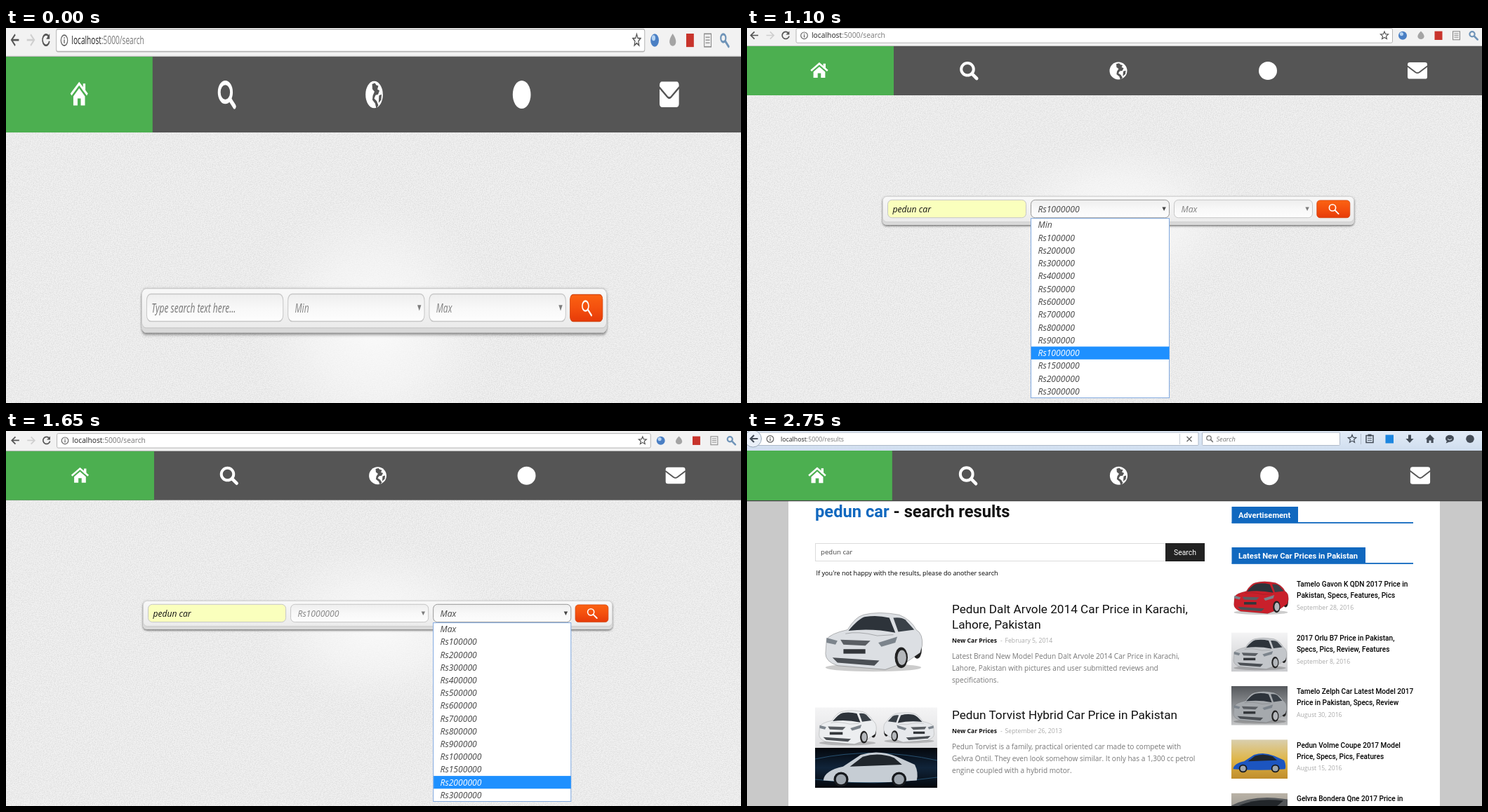
These frames come from a looping animation (1047x535 px, 3.3 s). An HTML page:

```html
<!DOCTYPE html>
<html lang="en">
<head>
<meta charset="utf-8">
<title>Car search</title>
<style>
html, body { margin: 0; width: 100%; height: 100%; overflow: hidden; background: #ebebeb; }
svg { display: block; width: 1047px; height: 535px; }
text { white-space: pre; }
.sans { font-family: "Open Sans", "Noto Sans", sans-serif; }
.rob { font-family: Roboto, Arial, sans-serif; }
.it { font-style: italic; }
.scene { visibility: hidden; }
.scene.on { visibility: visible; }
</style>
</head>
<body>
<svg id="stage" viewBox="0 0 1047 535" xmlns="http://www.w3.org/2000/svg"></svg>
<script>
const STEP = 550;
const BRAND = "Pedun", QUERY = "pedun car";

// ---- drawing helpers (return SVG markup) ----
const rect = (x, y, w, h, fill, more = "") =>
  `<rect x="${x}" y="${y}" width="${w}" height="${h}" fill="${fill}" ${more}/>`;
const disc = (x, y, r, fill, more = "") =>
  `<circle cx="${x}" cy="${y}" r="${r}" fill="${fill}" ${more}/>`;
const oval = (x, y, rx, ry, fill, more = "") =>
  `<ellipse cx="${x}" cy="${y}" rx="${rx}" ry="${ry}" fill="${fill}" ${more}/>`;
const shape = (d, fill, more = "") => `<path d="${d}" fill="${fill}" ${more}/>`;
const line = (d, color, w, more = "") =>
  `<path d="${d}" fill="none" stroke="${color}" stroke-width="${w}" ${more}/>`;
const text = (x, y, size, fill, str, cls = "sans", more = "") =>
  `<text x="${x}" y="${y}" font-size="${size}" fill="${fill}" class="${cls}" ${more}>${str}</text>`;
const group = (transform, body) => `<g transform="${transform}">${body}</g>`;
const place = ([x, sx, y, sy], body) => group(`matrix(${sx} 0 0 ${sy} ${x} ${y})`, body);
const grad = (id, stops) => `<linearGradient id="${id}" x2="0" y2="1">` +
  stops.map((c, i) => `<stop offset="${i / (stops.length - 1)}" stop-color="${c}"/>`).join("") +
  `</linearGradient>`;

const pen = document.createElement("canvas").getContext("2d");
function width(str, font) {
  pen.font = font;
  return pen.measureText(str).width;
}

function star(cx, cy, r, color) {
  const pts = [...Array(10).keys()].map(i => {
    const a = i * Math.PI / 5 - Math.PI / 2, q = i % 2 ? r * 0.45 : r;
    return `${(cx + q * Math.cos(a)).toFixed(2)} ${(cy + q * Math.sin(a)).toFixed(2)}`;
  });
  return line(`M${pts.join("L")}Z`, color, 1.2);
}
const lens = (x, y, r, tail, color, w) =>
  disc(x, y, r, "none", `stroke="${color}" stroke-width="${w}"`) +
  line(`M${x + r * 0.75} ${y + r * 0.75}l${tail} ${tail}`, color, w * 1.15, 'stroke-linecap="round"');
const info = (x, y) => disc(x, y, 4.8, "none", 'stroke="#666" stroke-width="1.2"') +
  rect(x - 0.6, y - 0.8, 1.2, 3.6, "#555") + rect(x - 0.6, y - 2.8, 1.2, 1.2, "#555");

const defs = `<defs>
  ${grad("panel", ["#f8f8f8", "#ebebeb"])}
  ${grad("field", ["#eeeeee", "#f8f8f8", "#fdfdfd"])}
  ${grad("button", ["#fb6212", "#f4500e", "#e63a08"])}
  ${grad("bar", ["#e2ebf7", "#d0deef"])}
  ${grad("studio", ["#f4f4f5", "#c9cacd"])}
  ${grad("road", ["#55585c", "#8e9194", "#c4c5c6"])}
  ${grad("night", ["#04070c", "#10243a", "#05080d"])}
  ${grad("gold", ["#d9cfae", "#dfb64a", "#c08d2c"])}
  ${grad("close", ["#b9b2a6", "#77797b"])}
  <radialGradient id="glow"><stop offset="0" stop-color="#fafafa"/>
    <stop offset=".5" stop-color="#f7f7f7" stop-opacity=".65"/>
    <stop offset="1" stop-color="#f2f2f2" stop-opacity="0"/></radialGradient>
  <filter id="paper" x="0" y="0" width="1" height="1">
    <feTurbulence type="fractalNoise" baseFrequency=".7" numOctaves="2" seed="4"/>
    <feColorMatrix values="0 0 0 0 0  0 0 0 0 0  0 0 0 0 0  0 0 0 .16 -.05"/></filter>
  <filter id="drop" x="-5%" y="-20%" width="110%" height="160%">
    <feDropShadow dx="0" dy="1.5" stdDeviation="1.6" flood-color="#000" flood-opacity=".55"/></filter>
</defs>`;

// ---- navigation bar, shared by all pages ----
const nav = rect(-10, 26, 1080, 70, "#555") + rect(-10, 26, 219, 70, "#4caf50") +
  group("translate(0 .8)",
    line("M91.2 60.2L103 50L114.8 60.2", "#fff", 2.6) + rect(108.6, 50, 3.4, 7, "#fff") +
    shape("M94.6 61.8L103 54.4L111.4 61.8V70.2H105.3V63.8H100.7V70.2H94.6Z", "#fff") +
    lens(314, 58, 8.8, 6.6, "#fff", 4) +
    disc(529, 60.2, 12.5, "#fff") +
    shape("M526 50.5l4-1 2 2 3 .6-1.4 3.2 3 1.2-2 3.6-3.6.6-2 3 3.6 2.4 2.4 4-3 3-1.6-4.6-4-3.4.6-4 2.4-3.6-3-2.4z", "#555") +
    shape("M536 61l3.6-1-.6 5-3.6 3z", "#555")) +
  disc(742, 61, 13, "#fff") +
  rect(941, 49, 28, 23.6, "#fff", 'rx="3.2"') +
  line("M940.5 54.2L952.4 63.2Q955 65 957.6 63.2L969.5 54.2", "#555", 1.9);

// ---- browser bar of the search page ----
const arrowLeft = "M16 10.5H6M10.6 5.4L5.4 10.5L10.6 15.6";
const searchBar = rect(-10, -10, 1080, 36, "#f2f2f2") + rect(-10, 25.2, 1080, 0.9, "#b9b9b9") +
  rect(70, 0.6, 849.5, 20.6, "#fff", 'rx="2" stroke="#b4b4b4" stroke-width="1"') +
  line(arrowLeft, "#555", 1.7) +
  group("translate(43.5 0) scale(-1 1)", line(arrowLeft, "#cfcfcf", 1.7)) +
  line("M59 7.3A5 5 0 1 0 60 11.6", "#555", 1.7) + shape("M60.4 4.6V9.6H55.4Z", "#555") +
  info(81.5, 10.8) +
  text(92, 14.4, 10.3, "#222", 'localhost<tspan fill="#777">:5000/search</tspan>') +
  star(908, 10.8, 5.8, "#555") +
  disc(934, 10.8, 6, "#4a7fc4") + disc(932.4, 8.6, 2.6, "#b5d3f2") +
  shape("M960 4.6Q965 9.4 964.6 12.6A4.7 4.4 0 0 1 955.4 12.6Q955 9.4 960 4.6Z", "#a4a4a4") +
  rect(979.5, 4.6, 11, 12.4, "#c8342c") +
  rect(1005.5, 4.8, 10, 12, "#eee", 'stroke="#888"') +
  line("M1007.4 8H1013.6M1007.4 10.6H1013.6M1007.4 13.2H1013.6", "#999", 1) +
  lens(1033, 8.8, 3.6, 5, "#6f94b8", 2.2);

// ---- search form ----
const FIELDS = [200, 404, 608];
const SUMS = [1, 2, 3, 4, 5, 6, 7, 8, 9, 10, 15, 20, 30].map(n => `Rs${n}00000`);

function field(i, label, { fill = "url(#field)", color = "#828282", focus = false } = {}) {
  const x = FIELDS[i];
  return rect(x + 0.5, 245.3, 197, 25.4, fill, `rx="6" stroke="${focus ? "#999" : "#c6c6c6"}"`) +
    text(x + (i ? 10.5 : 7.5), 262.8, 12.2, color, label, "sans it") +
    (i ? shape(`M${x + 187.4} 255.6h5.4l-2.7 5.4z`, focus ? "#444" : "#7d7d7d") : "");
}

function picker(i, first, chosen) {
  const x = FIELDS[i], row = 18.28, top = 271.7;
  const rows = [first, ...SUMS].map((label, n) => {
    const y = top + n * row, on = label === chosen;
    return (on ? rect(x + 1, y, 196.5, row, "#1e90ff") : "") +
      text(x + 10.5, y + 13.6, 12.2, on ? "#fff" : "#444", label, "sans it");
  });
  return rect(x + 0.5, top, 197, row * 14, "#fff", 'stroke="#7fa8e0"') + rows.join("");
}

function suggestions() {
  const items = [QUERY, "pedun", "https://github.com/", `${BRAND} car prices 2000000 to 1000000`,
    `${BRAND} car prices 2000000 to 3000000`, QUERY + "`"];
  return rect(199.8, 272, 197.6, 115, "#fff", 'stroke="#bdbdbd" stroke-width=".9"') +
    rect(200.2, 272.6, 196.8, 19.2, "#c8c8c8") +
    items.map((s, i) => text(205.8, 285.6 + i * 19, 8.8, "#111", s, "sans", 'font-weight="700"')).join("");
}

function typed() {
  const font = 'italic 12.2px "Open Sans", "Noto Sans", sans-serif';
  const x = 207.5 + width(QUERY[0], font);
  const w = width(QUERY.slice(1), font);
  return rect(x, 250, w, 17.2, "#3390f0") +
    text(207.5, 262.8, 12.2, "#111", `${QUERY[0]}<tspan fill="#fff">${QUERY.slice(1)}</tspan>`, "sans it");
}

function searchPage({ at, query, min = "Min", max = "Max", open }) {
  const yellow = { fill: "#faffbd", color: "#111" };
  const input = open === "text" ? field(0, "", { ...yellow, focus: true }) + typed()
    : query ? field(0, query, yellow)
    : field(0, "Type search text here...", { color: "#757575" });
  const select = (i, label, key) =>
    field(i, label, open === key ? { color: "#444", focus: true } : {});
  const popup = { text: suggestions, min: () => picker(1, "Min", min), max: () => picker(2, "Max", "Rs2000000") }[open];
  return place(at,
    oval(530, 275, 180, 120, "url(#glow)") + searchBar + nav +
    rect(193, 240, 672, 41, "#d9d9d9", 'rx="6" filter="url(#drop)"') +
    rect(193.4, 240.3, 671.2, 36.4, "url(#panel)", 'rx="6" stroke="#c9c9c9" stroke-width=".8"') +
    input + select(1, min, "min") + select(2, max, "max") +
    rect(811.8, 245.9, 47, 24.8, "url(#button)", 'rx="4.5" stroke="#d2430f" stroke-width=".8"') +
    lens(834, 256.4, 4.6, 5.2, "#fff", 1.6) +
    (popup ? popup() : ""));
}

// ---- results page ----
const BLUE = "#1068bf";

// front three-quarter car, 100 by 60 units
const car = (x, y, s, body, flip = 1) => group(`translate(${x} ${y}) scale(${s * flip} ${s})`,
  oval(50, 56, 48, 4, "#000", 'opacity=".2"') + oval(94, 38, 4.5, 9, "#222") +
  shape("M3 28Q6 22 24 18Q32 5 40 3Q55 -1 76 3Q88 8 93 18Q100 22 99 34L97 41L84 50L62 58L14 54Q2 50 2 42Z",
    body, 'stroke="#000" stroke-opacity=".25" stroke-width=".7"') +
  shape("M25 19Q36 6 42 5Q54 3 66 6L72 21Q48 16 25 19Z", "#2d333a") +
  shape("M75 20L70 6Q78 5 82 8L91 18Z", "#3a4148") +
  line("M22 22Q34 19 54 24L70 23", "#000", 0.7, 'opacity=".25"') +
  oval(78, 46, 6.5, 10.5, "#222") + oval(78.6, 46, 4.4, 7.6, "#b4b7bb") +
  shape("M17 28L47 29L42 34L20 33Z", "#5a5e63") +
  shape("M3 26L14 29L12 33L3 31Z", "#7c848c") + shape("M55 31L74 25L72 31L58 35Z", "#7c848c") +
  rect(20, 37.5, 22, 4.5, "#33363a") + shape("M9 46L56 49L51 54L14 51Z", "#4b4f54"));

const sideCar = (x, y, s, body) => group(`translate(${x} ${y}) scale(${s})`,
  shape("M2 36Q3 26 22 22L40 10Q58 4 77 12L95 20Q99 28 97 36Q50 40 2 36Z", body) +
  shape("M29 22L42 12Q58 7 74 13L82 20Z", "#20262c") +
  [20, 79].map(c => disc(c, 35, 7.5, "#16191d") + disc(c, 35, 5.2, "#9da5ad")).join(""));

const lines = (x, y, gap, list, draw) => list.map((s, i) => draw(x, y + i * gap, s)).join("");

function result(y, title, date, body) {
  const meta = y + 22.2 * (title.length - 1) + 20;
  return lines(292, y, 22.2, title, (x, v, s) => text(x, v, 17.2, "#111", s, "rob")) +
    text(292, meta, 8.6, "#111", "New Car Prices", "sans", 'font-weight="700"') +
    text(361, meta, 8.7, "#aaa", "-") + text(367.5, meta, 8.7, "#aaa", date) +
    lines(292, meta + 22.8, 16.8, body, (x, v, s) => text(x, v, 10.1, "#777", s));
}

const heading = (y, w, label) => rect(690.5, y, w, 23, BLUE) + rect(690.5, y + 22, 258.5, 1.8, BLUE) +
  text(700, y + 15.8, 11.2, "#fff", label, "rob", 'font-weight="700"');

const frame = fill => rect(690, 211.2, 80, 55.6, fill);
const thumbs = [
  car(692, 214, 0.8, "#c9202b"),
  frame("url(#studio)") + car(691.5, 218, 0.78, "#c3c6ca"),
  frame("url(#road)") + car(691.5, 218, 0.78, "#a5a9ad"),
  frame("url(#gold)") + sideCar(691, 225, 0.78, "#1c55c0"),
  frame("url(#close)") +
    shape("M690 229Q722 212 770 220V267H690Z", "#54575a") + shape("M700 229Q728 217 764 222L752 232Z", "#22262a")
];
const news = [
  ["Tamelo Gavon K QDN 2017 Price in", "Pakistan, Specs, Features, Pics", "September 28, 2016"],
  ["2017 Orlu B7 Price in Pakistan,", "Specs, Pics, Review, Features", "September 8, 2016"],
  ["Tamelo Zelph Car Latest Model 2017", "Price in Pakistan, Specs, Review", "August 30, 2016"],
  [BRAND + " Volme Coupe 2017 Model", "Price, Specs, Pics, Features", "August 15, 2016"],
  ["Gelvra Bondera Qne 2017 Price in", "Pakistan, Specs, Features", ""]
];
const sidebar = news.map(([a, b, date], i) => group(`translate(0 ${i * 76.4})`,
  thumbs[i] + lines(783, 222.4, 16, [a, b], (x, y, s) => text(x, y, 10.1, "#000", s, "rob", 'font-weight="500"')) +
  text(783, 255.2, 8.7, "#aaa", date))).join("");

const resultsBar = rect(0, 0, 1047, 28, "url(#bar)") +
  rect(16, 2, 627, 18.5, "#fff", 'rx="1" stroke="#aeb9c8"') +
  disc(8.5, 11, 12, "#eaf0f8", 'stroke="#9aa8ba"') +
  line("M15.5 11H5.5M10 6L5 11L10 16", "#444c57", 2.2) +
  info(33, 11.4) + text(48, 14.8, 8.8, "#222", 'localhost<tspan fill="#777">:5000/results</tspan>') +
  line("M616.5 4V19", "#c5ccd6", 1) + line("M626.5 8l7 7m0-7l-7 7", "#666", 1.4) +
  rect(648.5, 2, 196, 18.5, "#fff", 'rx="1" stroke="#aeb9c8"') +
  lens(658, 10, 3.2, 3, "#777", 1.3) + text(668.5, 14.8, 9.2, "#777", "Search", "sans it") +
  star(862, 11.4, 6, "#444c57") + line("M874.5 4V19", "#b5c0ce", 1) +
  rect(882, 6.5, 10, 10, "none", 'stroke="#444c57" stroke-width="1.5"') + rect(884.5, 4.6, 5, 3, "#444c57") +
  line("M884 10.2H890M884 13.2H890", "#444c57", 1.1) +
  rect(909.5, 5.5, 11.5, 12, "#1d86e0") +
  shape("M942 5.5h4v5.5h3.6L944 17l-5.6-6h3.6z", "#444c57") +
  shape("M966.5 11.6L973 5l6.5 6.6h-1.8V17h-3.2v-3.6h-3V17h-3.2v-5.4z", "#444c57") +
  oval(1001, 10.8, 6, 5, "#444c57") + shape("M997 14l-1.4 3.4 5-2z", "#444c57") +
  line("M998 11.4Q1001 14.4 1004 11.4", "#dfe8f4", 1) +
  disc(1030, 11.2, 5.8, "#444c57");

function resultsPage() {
  const photo = rect(97, 394.5, 174, 114.5, "url(#studio)") + rect(97, 452, 174, 57, "url(#night)") +
    car(101, 398, 0.84, "#eceef0") + car(268, 401, 0.74, "#e6e8eb", -1) +
    line("M97 497Q180 508 271 494M97 468Q180 450 271 470", "#27506f", 1) + sideCar(106, 448, 1.4, "#c6cdd4");
  return rect(0, 0, 1047, 535, "#c9c9c9") + rect(59, 99, 928, 436, "#fff") +
    place([-3.85, 1.0082, 0.57, 1.036], nav) + rect(0, 99, 1047, 1.2, "#444") + resultsBar +
    text(97, 123.4, 23.7, "#111", `<tspan fill="${BLUE}">${QUERY}</tspan> - search results`, "rob", 'font-weight="700"') +
    rect(97.5, 160.5, 500, 25, "#fff", 'stroke="#dcdcdc"') + text(105, 176.4, 9.6, "#444", QUERY) +
    rect(596, 160, 56, 26, "#222") + text(624, 176.6, 10.4, "#fff", "Search", "rob", 'text-anchor="middle"') +
    text(98.5, 206, 9.12, "#000", "If you're not happy with the results, please do another search") +
    car(109, 258, 1.42, "#dcdfe3") + photo +
    result(260, [BRAND + " Dalt Arvole 2014 Car Price in Karachi,", "Lahore, Pakistan"], "February 5, 2014",
      [`Latest Brand New Model ${BRAND} Dalt Arvole 2014 Car Price in Karachi,`,
       "Lahore, Pakistan with pictures and user submitted reviews and", "specifications."]) +
    result(411.2, [BRAND + " Torvist Hybrid Car Price in Pakistan"], "September 26, 2013",
      [BRAND + " Torvist is a family, practical oriented car made to compete with",
       "Gelvra Ontil. They even look somehow similar. It only has a 1,300 cc petrol",
       "engine coupled with a hybrid motor."]) +
    heading(108, 94.5, "Advertisement") + heading(166, 190.5, "Latest New Car Prices in Pakistan") + sidebar;
}

const LOW = "Rs1000000", HIGH = "Rs2000000";
const scenes = [
  searchPage({ at: [2.6, 0.9866, 0.9, 1.543] }),
  searchPage({ at: [4.6, 0.9866, 1.1, 1.338], query: QUERY, min: LOW, open: "text" }),
  searchPage({ at: [0, 1, 0, 1], query: QUERY, min: LOW, open: "min" }),
  searchPage({ at: [2.9, 0.9955, 3, 0.996], query: QUERY, min: LOW, open: "max" }),
  searchPage({ at: [2.4, 0.9926, 1.27, 1.0667], query: QUERY, min: LOW, max: HIGH }),
  resultsPage()
];

const stage = document.getElementById("stage");
stage.innerHTML = defs + rect(0, 0, 1047, 535, "#f2f2f2") +
  rect(0, 0, 1047, 535, "#fff", 'filter="url(#paper)"') +
  scenes.map(s => `<g class="scene">${s}</g>`).join("");
const layers = [...stage.querySelectorAll(".scene")];

const start = performance.now();
let shown = -1;
function tick() {
  const i = Math.floor((performance.now() - start) / STEP) % layers.length;
  if (i !== shown) {
    layers.forEach((g, n) => g.classList.toggle("on", n === i));
    shown = i;
  }
  requestAnimationFrame(tick);
}
tick();
</script>
</body>
</html>
```
